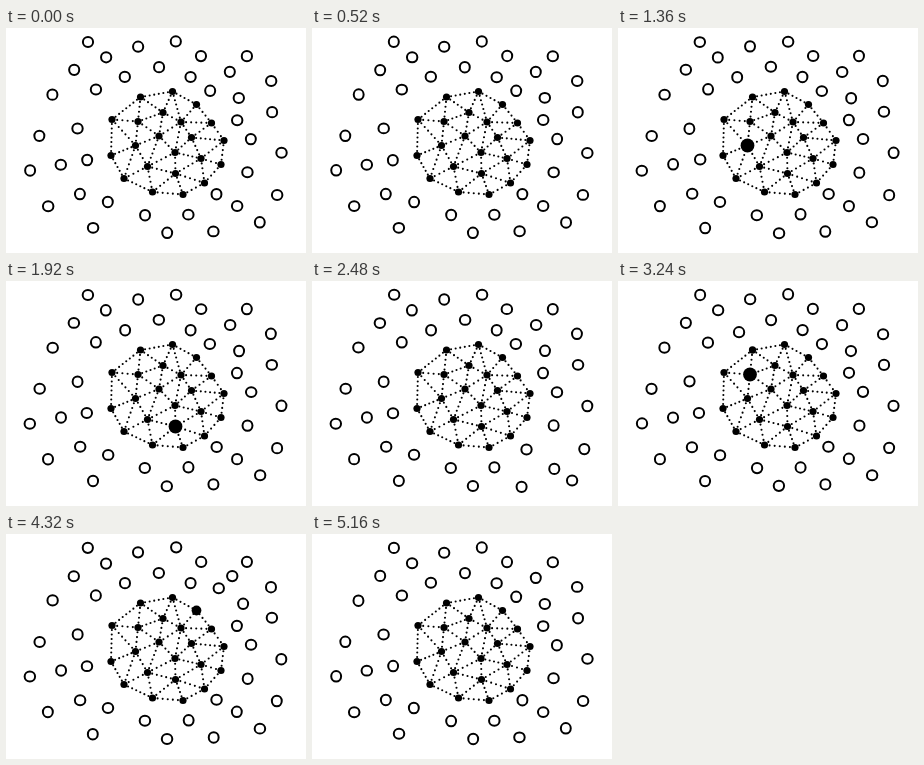
Animation, 300 px wide and 225 px high, one loop 5200 ms. Source, as an HTML page:

```html
<!DOCTYPE html>
<html lang="en">
<head>
<meta charset="utf-8">
<title>Network ripple</title>
<style>
  html, body { margin: 0; width: 100%; height: 100%; overflow: hidden; background: #fff; }
  svg { display: block; width: 100vw; height: 100vh; }
</style>
</head>
<body>
<svg id="stage" viewBox="0 0 300 225"></svg>
<script>
const LOOP = 5200, STEP = 40;
const stage = document.getElementById('stage');

const rings = [
  [82, 14], [132, 18.5], [170, 13.5], [100, 29.5], [195, 28], [241, 28], [68, 42], [119, 49],
  [153, 39], [184.5, 49], [224, 44], [265, 53], [46.5, 66.5], [90, 61.5], [204, 63], [233, 70],
  [266, 84], [71.5, 100.5], [33.5, 108], [231, 92], [245, 111], [275.5, 125], [24, 142.5],
  [55, 136.5], [81, 132], [241.5, 144.5], [74, 166], [42, 178], [102, 174], [87, 200],
  [139, 187], [182.5, 186.5], [161, 205], [207.5, 203.5], [210.5, 166], [231, 178],
  [254, 194.5], [271, 167]
];

const nodes = [
  [134.5, 69], [166.5, 63.5], [190.5, 76.5], [106, 91.5], [132, 93.5], [157, 84.5], [175, 94],
  [205.5, 95], [153, 108], [185.5, 109.5], [218, 112.5], [129.5, 117.5], [105, 127.5],
  [169, 124.5], [195, 130.5], [215, 136.5], [141.5, 138.5], [169.5, 145.5], [198.5, 155],
  [118, 150.5], [146.5, 164], [177, 166.5]
];

// Ring pushes: ring index, peak time, offset x, offset y
const pushes = [
  [22, 890, 11, -2], [23, 1020, 11, -2], [24, 1150, 11, -3],
  [34, 2320, 11, 7], [35, 2450, 11.5, 10], [36, 2580, 12, 10], [33, 2480, 2, 2.5], [37, 2520, 1.5, 1],
  [0, 2800, 8, 9], [3, 2930, 8, 9], [7, 3060, 9, 9],
  [14, 4330, 9, -9], [10, 4460, 10, -10], [5, 4590, 8, -9], [15, 4360, 4.5, 0]
];

// Node swells: node index, peak time
const swells = [
  [12, 1220], [11, 1360], [16, 1640], [17, 1920], [18, 2200],
  [0, 3110], [4, 3240], [5, 3573], [6, 3907], [2, 4240]
];

function add(tag, attrs) {
  const el = document.createElementNS('http://www.w3.org/2000/svg', tag);
  for (const key in attrs) el.setAttribute(key, attrs[key]);
  return stage.appendChild(el);
}

const distance = (a, b) => Math.hypot(a[0] - b[0], a[1] - b[1]);

function circumcenter([ax, ay], [bx, by], [cx, cy]) {
  const d = 2 * (ax * (by - cy) + bx * (cy - ay) + cx * (ay - by));
  const a = ax * ax + ay * ay, b = bx * bx + by * by, c = cx * cx + cy * cy;
  return [
    (a * (by - cy) + b * (cy - ay) + c * (ay - by)) / d,
    (a * (cx - bx) + b * (ax - cx) + c * (bx - ax)) / d
  ];
}

// Delaunay edges, without the long ones along the rim
function findEdges(points, maxLength) {
  const edges = new Map();
  points.forEach((a, i) => points.forEach((b, j) => points.forEach((c, k) => {
    if (i >= j || j >= k) return;
    const center = circumcenter(a, b, c);
    const radius = distance(center, a);
    if (points.some(p => distance(p, center) < radius - 0.001)) return;
    for (const [p, q] of [[a, b], [b, c], [a, c]])
      if (distance(p, q) < maxLength) edges.set(p + ':' + q, [p, q]);
  })));
  return [...edges.values()];
}

for (const [a, b] of findEdges(nodes, 37.5)) {
  const length = distance(a, b);
  const gap = length / Math.round(length / 4.8);
  add('line', {
    x1: a[0], y1: a[1], x2: b[0], y2: b[1], stroke: '#000', 'stroke-width': 2.1,
    'stroke-linecap': 'round', 'stroke-dasharray': `0 ${gap}`
  });
}

const nodeEls = nodes.map(([cx, cy]) => add('circle', { cx, cy, r: 3.6 }));
const ringEls = rings.map(() => add('ellipse', { fill: '#fff', stroke: '#000', 'stroke-width': 2 }));

function bump(t, peak, rise, fall) {
  const u = (t - peak) / (t < peak ? rise : fall);
  return Math.abs(u) < 1 ? Math.cos(u * Math.PI / 2) ** 2 : 0;
}

function draw(t) {
  const turn = t / LOOP * Math.PI * 2;
  const places = rings.map(([x, y], i) => [
    x + 0.2 * Math.sin(turn * (7 + i % 4) + i * 2.4),
    y + 0.2 * Math.sin(turn * (8 + i % 3) + i * 1.7)
  ]);
  for (const [i, peak, dx, dy] of pushes) {
    const k = bump(t, peak, 200, 267);
    places[i][0] += dx * k;
    places[i][1] += dy * k;
  }
  ringEls.forEach((el, i) => {
    const squash = 0.15 * Math.sin(turn * 9 + i * 3.1);
    el.setAttribute('cx', places[i][0]);
    el.setAttribute('cy', places[i][1]);
    el.setAttribute('rx', 5.1 + squash);
    el.setAttribute('ry', 5.1 - squash);
  });
  for (const [i, peak] of swells)
    nodeEls[i].setAttribute('r', 3.6 + 3.3 * bump(t, peak, 140, 140));
}

const start = performance.now();
function frame() {
  const t = (performance.now() - start) % LOOP;
  draw(Math.floor(t / STEP) * STEP);
  requestAnimationFrame(frame);
}
draw(0);
requestAnimationFrame(frame);
</script>
</body>
</html>
```
